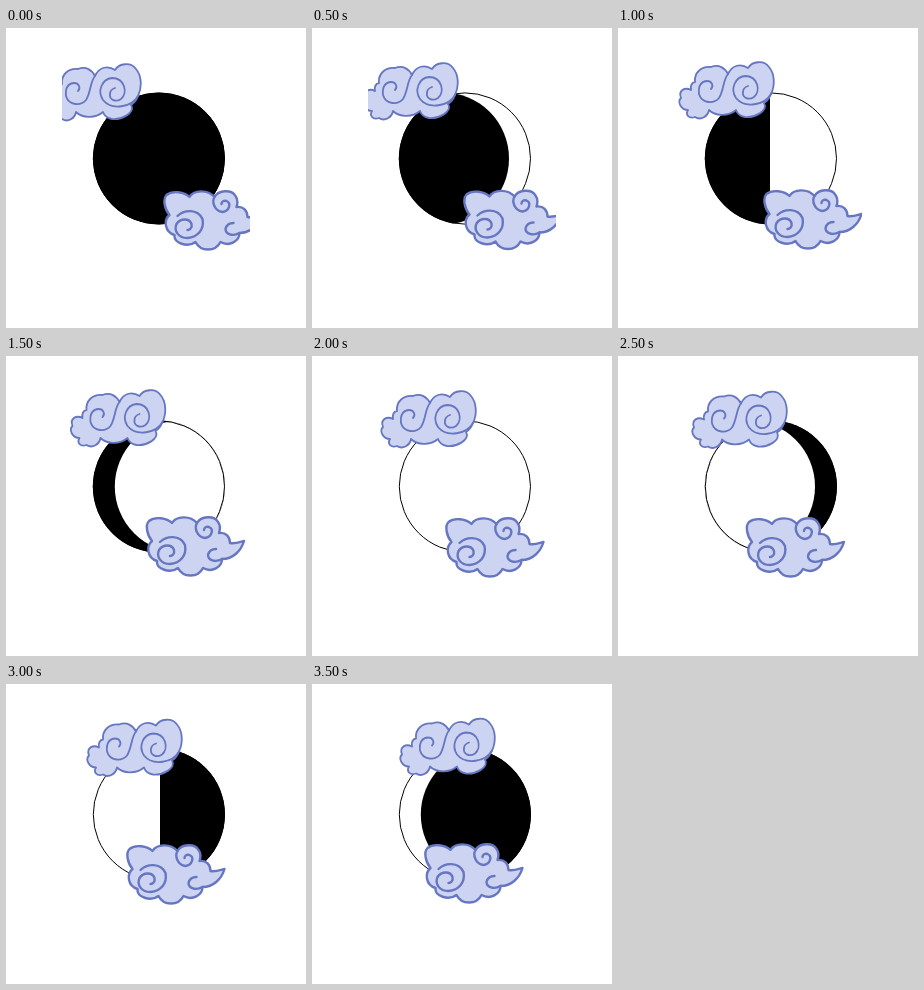
Animation of 300x300 px, one loop 4000 ms. Source, as an HTML page:

```html
<!DOCTYPE html>
<html lang="en">
<head>
<meta charset="utf-8">
<title>Moon phases</title>
<style>
html, body { margin: 0; width: 100%; height: 100%; overflow: hidden; background: #fff; }
svg { display: block; width: 100vw; height: 100vh; }
.cloud { fill: #cdd4f2; stroke: #6676c1; stroke-linecap: round; stroke-linejoin: round; }
.curl { fill: none; }
</style>
</head>
<body>
<svg viewBox="0 0 300 300">
  <defs>
    <clipPath id="window"><rect x="56" y="30" width="188" height="196"/></clipPath>
    <clipPath id="disc"><circle cx="152.9" cy="130.5" r="66.1"/></clipPath>
  </defs>
  <g clip-path="url(#window)">
    <g clip-path="url(#disc)">
      <rect id="base" x="80" y="60" width="146" height="142"/>
      <rect id="half" y="60" width="72" height="142"/>
      <circle id="cover" cy="130.5" r="66.1"/>
    </g>
    <circle cx="152.9" cy="130.5" r="65.6" fill="none" stroke="#000"/>
    <g id="upper" class="cloud" stroke-width="1.8">
      <path d="M70 82 C63 82 59 74 63 70 C60 62 67 59 73 62
        C72 58 74 54 77 54 C76 45 83 38 93 39 C101 36 107 40 110 46
        C114 37 123 35 130 40 C134 33 146 32 151 39
        C157 46 157 58 153 66 C151 71 148 74 146 75
        C151 83 136 90 127 89 C121 88 119 85 118 82
        C110 89 97 88 91 82 C90 88 83 93 77 89 C71 91 67 87 70 82 Z"/>
      <path class="curl" d="M110 46 C105 52 106 62 101 70 C96 76 84 76 81 66 C80 57 84 53 89 53 C94 53 96 58 93 61"/>
      <path class="curl" d="M153 66 C147 77 127 81 118 70 C112 61 117 49 127 48 C140 48 143 63 136 69 C130 73 124 69 125 64 C125 61 127 59 130 58"/>
    </g>
    <g id="lower" class="cloud" stroke-width="2.4">
      <path d="M134 186 C129 180 127 170 131 166 C137 161 149 163 154 168
        C158 161 172 160 179 168 C183 161 196 160 200 167
        C203 171 202 175 201 178 C208 177 212 182 212 188
        C217 189 222 187 226 186 C223 196 215 204 204 204
        C204 212 194 218 185 213 C180 223 165 223 160 213
        C152 219 138 214 139 206 C129 203 128 191 134 186 Z"/>
      <path class="curl" d="M142 187 C148 181 162 179 167 190 C169 201 162 208 152 209 C143 209 138 202 141 195 C145 189 154 189 156 195 C157 199 154 201 152 201"/>
      <path class="curl" d="M179 168 C176 173 179 182 187 183 C194 182 196 174 191 172 C188 171 186 173 186 175"/>
      <path class="curl" d="M204 204 C197 208 190 205 190 200 C191 196 194 194 198 194"/>
    </g>
  </g>
</svg>
<script>
const byId = id => document.getElementById(id);
const base = byId('base'), half = byId('half'), cover = byId('cover');
const upper = byId('upper'), lower = byId('lower');
const STEP = 500, COUNT = 8, CX = 152.9, SHIFT = 22;
const upperX = [-21, -10, 0, 3.5, 8, 13, 20, 27];
const upperY = [2, 1, 0, 0, 1, 1.5, 1.5, 0.5];
const lowerX = [29.5, 23.5, 17.5, 12, 5.5, 0, -7.5, -15.5];
const lowerY = [1, 0.5, 0, -1, 0, 0, -1, -2];

function set(node, attrs) {
  for (const key in attrs) node.setAttribute(key, attrs[key]);
}

// A shifted disc slides across the moon; the quarters use a straight edge.
function moon(phase) {
  const quarter = phase % 4 === 2;
  const full = phase % 4 === 0;
  const bright = phase > 2 && phase < 6;
  const side = phase === 3 || phase === 7 ? 1 : -1;
  set(base, { fill: bright && !full ? '#000' : '#fff' });
  set(cover, {
    fill: bright ? '#fff' : '#000',
    cx: full ? CX : CX + side * SHIFT,
    visibility: quarter ? 'hidden' : 'visible'
  });
  set(half, { x: phase === 2 ? 80 : 154, visibility: quarter ? 'visible' : 'hidden' });
  if (quarter) set(base, { fill: '#fff' });
}

function draw(ms) {
  const i = Math.floor(ms / STEP) % COUNT;
  moon(i);
  set(upper, { transform: `translate(${upperX[i]} ${upperY[i]})` });
  set(lower, { transform: `translate(${lowerX[i]} ${lowerY[i]})` });
}

const start = performance.now();
function tick() {
  draw(performance.now() - start);
  requestAnimationFrame(tick);
}
tick();
</script>
</body>
</html>
```
